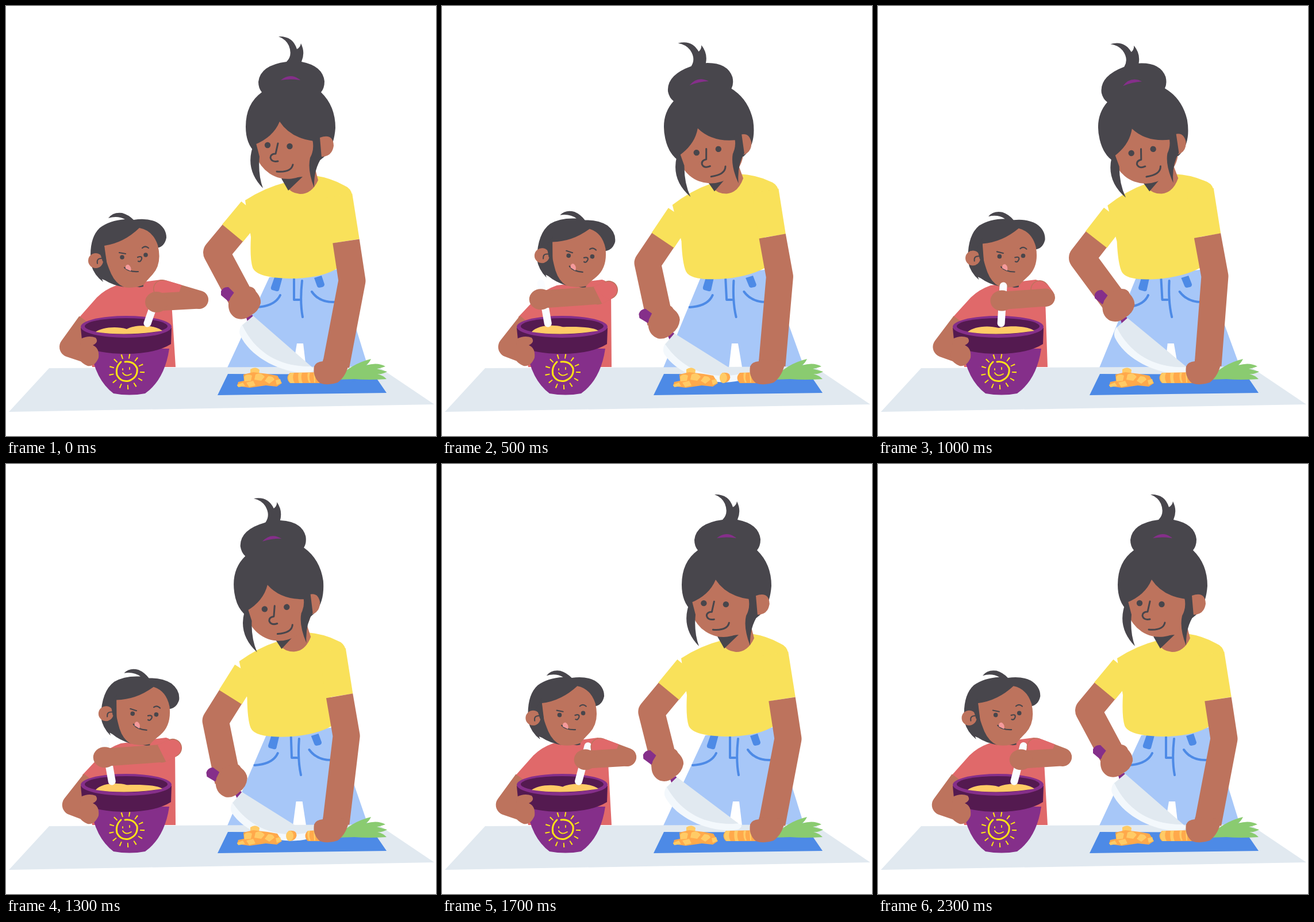
An HTML page for the animation above (2.4 s loop, 748x748 px).

```html
<!DOCTYPE html>
<html lang="en">
<head>
<meta charset="utf-8">
<title>Cooking together</title>
<style>
html, body { margin: 0; height: 100%; overflow: hidden; background: #fff; }
svg { display: block; width: 100%; height: 100%; }
.skin { fill: #bd735d; }
.hair { fill: #48464c; }
.red { fill: #e0696a; }
.yellow { fill: #f9e15a; }
.purple { fill: #852f8a; }
.dark { fill: #541a50; }
.blue { fill: #4d8ae6; }
.pale { fill: #e1e9f0; }
.orange { fill: #ffa94b; }
.light { fill: #ffcb66; }
.limb, .line { fill: none; stroke-linejoin: round; }
.limb { stroke: #bd735d; }
.sleeve { stroke: #f9e15a; stroke-width: 47; }
.line { stroke: #48464c; stroke-linecap: round; }
.denim { stroke: #4d8ae6; stroke-width: 4; }
.sun { stroke: #ffe414; }
</style>
</head>
<body>
<svg viewBox="0 0 748 748">
  <!-- child -->
  <g id="kidBody">
    <path class="red" d="M128 541L158 507Q172 493 192 486L270 476Q286 480 287 500L295 628H150Z"/>
  </g>
  <g id="kidHead">
    <path class="hair" d="M222 484L239 481V488Q230 491 222 486Z"/>
    <path class="hair" d="M178 369Q186 358 202 360Q213 363 222 372Q245 368 262 376Q279 386 279 403Q276 419 262 421L190 440L206 489Q186 486 172 477L167 475L169 480Q153 468 148 450Q143 405 163 386Q180 373 207 371Q194 364 178 369Z"/>
    <path class="skin" d="M171 417Q205 412 232 386Q255 390 264 416Q272 448 255 467Q240 483 240 485Q222 492 205 489Q191 483 183 466Q177 452 175 445Z"/>
    <circle class="skin" cx="156" cy="443" r="13"/>
    <path class="hair" d="M170 408L172 430L175 446L168 444L162 425Z"/>
    <path class="line" stroke-width="2" d="M159 448Q157 439 166 439"/>
    <circle class="hair" cx="202" cy="437" r="3.8"/>
    <circle class="hair" cx="243" cy="433" r="3.8"/>
    <path class="line" stroke-width="2.2" d="M197 429L208 431M237 421Q242 416 248 421M229 437Q237 434 236 440Q234 446 230 444M206 455Q214 463 230 462"/>
    <path fill="#f59a9b" d="M208 457Q207 449 213 450Q219 454 217 461Z"/>
  </g>

  <!-- mother, behind the table -->
  <g id="jeans">
    <path fill="#a7c7f8" d="M458 472L577 458L630 629H385Z"/>
    <path fill="#fff" d="M506 587H517L522 629H499Z"/>
    <path class="blue" d="M467 472L481 472L475 494Q474 497 470 496L463 494Q460 493 461 489ZM536 473L549 469L554 484Q554 488 550 489L545 490Q542 490 541 487Z"/>
    <path class="line denim" d="M501 475V511H510M515 478Q511 515 516 541M477 503Q468 522 436 524M532 497Q545 516 572 515"/>
  </g>
  <g id="torso">
    <path class="yellow" d="M486 307Q450 316 416 338L426 402Q424 440 429 455Q436 474 500 474Q550 473 577 456L570 400L602 328Q600 317 588 312Q565 299 537 295Z"/>
    <path class="skin" d="M482 300L537 280L543 303Q532 327 512 327Q496 326 488 314Z"/>
    <path class="hair" d="M479 300L516 297L491 321Z"/>
  </g>
  <line id="sleeveL" class="sleeve"/>
  <g id="head">
    <path class="hair" d="M474 53Q499 52 506 75Q512 72 513 65Q521 81 514 97Q551 104 554 131Q554 143 548 150Q573 174 573 212Q570 255 543 270L434 255Q417 240 417 210Q417 170 445 150Q439 143 439 132Q442 103 488 97Q499 86 492 69Q487 58 474 53Z"/>
    <path class="purple" d="M478 129Q495 115 512 129Q495 126 478 129Z"/>
    <g id="face">
      <path class="skin" d="M476 201Q465 228 433 241A57 57 0 0 0 542 267L536 235Q495 230 476 201Z"/>
      <g id="features">
        <circle class="hair" cx="455" cy="242" r="5.2"/>
        <circle class="hair" cx="493.5" cy="244" r="5.2"/>
        <path class="line" stroke-width="3" d="M473 239L469 257Q460 257 460 264Q462 272 473 270M471 288Q496 290 499 276"/>
      </g>
    </g>
    <path id="ear" class="skin" d="M546 229Q569 221 570 243Q567 264 545 262Z"/>
    <path id="lockL" class="hair" d="M429 246Q416 285 447 317Q438 292 441 262L434 235Z"/>
    <path id="lockR" class="hair" d="M533 232Q537 250 529 264Q524 285 536 316Q535 285 549 264L546 229Z"/>
  </g>

  <!-- table and bowl -->
  <path class="pale" d="M75 630L647 627L745 693L5 706Z"/>
  <path class="blue" d="M386 640L640 641L662 673L368 677Z"/>
  <polyline id="kidArmL" class="limb" stroke-width="36"/>
  <path class="purple" d="M147 596Q155 650 187 674Q215 679 242 674Q276 650 284 596Z"/>
  <path class="dark" d="M130 560L133 591Q160 605 209 605Q260 605 287 588L288 560Z"/>
  <ellipse class="purple" cx="209" cy="558" rx="79" ry="19"/>
  <ellipse class="dark" cx="209" cy="557" rx="72" ry="14"/>
  <path id="dough" class="light"/>
  <g class="sun">
    <path class="line sun" stroke-width="3" d="M200 619Q190 628 193 642Q200 655 214 652Q230 646 228 630Q222 617 207 619"/>
    <path class="line sun" stroke-width="1.8" d="M203 638Q208 646 218 640M203 631V633M215 629V632"/>
    <circle fill="none" stroke-width="8" stroke-dasharray="2 11.05" cx="210" cy="636" r="27"/>
  </g>
  <line id="spoon" stroke="#fafcff" stroke-width="13" stroke-linecap="round"/>
  <polyline id="kidArmR" class="limb" stroke-width="32" stroke-linecap="round"/>
  <g id="kidSleeve">
    <line stroke="#e0696a" stroke-width="32"/>
    <circle class="red" r="14.5"/>
  </g>
  <g id="kidFore">
    <line class="limb" stroke-width="31" stroke-linecap="round"/>
    <ellipse class="skin" rx="20" ry="18"/>
  </g>
  <path class="skin" d="M130 579Q144 572 156 577Q162 585 151 590Q163 595 161 612Q154 628 142 626Q122 618 128 600Z"/>

  <!-- knife arm -->
  <polyline id="armR" class="limb" stroke-width="46"/>
  <line id="sleeveR" class="sleeve"/>
  <g id="knife">
    <path class="purple" d="M374 496Q378 488 387 489L398 500L387 514L374 503ZM418 542L428 537L432 543L421 553Z"/>
    <path fill="#f3f8fc" d="M411 554Q450 605 528 625L536 631Q534 639 520 638C480 638 425 612 407 572Q404 563 411 554Z"/>
    <path class="pale" d="M430 539L531 627C485 628 437 610 411 555Z"/>
    <path class="skin" d="M390 508L400 494L421 488Q432 488 435 497Q444 507 443 517Q439 532 426 538Q414 548 400 543Q386 535 387 518Z"/>
  </g>

  <!-- vegetables -->
  <path class="light" d="M425 632Q434 626 441 633L440 641L425 642Z"/>
  <path class="orange" d="M413 641L430 637L455 640L472 643L480 656L471 662L452 660L424 664L402 661L404 654L414 652Z"/>
  <path class="light" d="M414 645Q420 638 428 643L426 652L415 653ZM434 641Q443 636 450 645L444 652L432 650ZM418 655L430 652L434 660L423 663ZM456 644Q465 643 467 650L458 657L450 652ZM402 659L412 655L416 661L404 663ZM469 651L477 649L479 656L471 659Z"/>
  <g id="carrot">
    <path class="orange"/>
    <path class="light"/>
  </g>
  <g id="slice">
    <path class="orange" d="M493 638Q507 636 507 646Q506 655 494 656Z"/>
    <ellipse class="light" cx="495" cy="647" rx="6.5" ry="9"/>
  </g>
  <path fill="#8acb70" d="M575 650Q600 622 635 614Q631 622 626 625Q647 619 660 627Q652 630 645 631L663 636Q655 641 646 640Q657 643 662 649Q630 651 606 649Z"/>
  <polyline id="armL" class="limb" stroke-width="47"/>
  <path class="skin" d="M552 614L597 617Q594 642 577 655Q560 661 546 656Q533 645 536 627Q539 619 551 618Z"/>
</svg>
<script>
const $ = id => document.getElementById(id);
const set = (el, attrs) => { for (const k in attrs) el.setAttribute(k, attrs[k]); };
const move = (id, transform) => set($(id), { transform });
const segment = (el, a, b) => set(el, { x1: a[0], y1: a[1], x2: b[0], y2: b[1] });
const distance = (a, b) => Math.hypot(b[0] - a[0], b[1] - a[1]);
const toward = (a, b, length) => {
  const k = length / distance(a, b);
  return [a[0] + (b[0] - a[0]) * k, a[1] + (b[1] - a[1]) * k];
};
const ease = (t, from, to) => {
  const x = Math.min(1, Math.max(0, (t - from) / (to - from)));
  return (1 - Math.cos(Math.PI * x)) / 2;
};

const stir = [0, .13, .49, .9, 1, .95, .55, .14];
const CHOP = 920;
// phase, handle x, handle y, tilt, elbow x, elbow y
const chop = [
  [0, 385, 501, 0, 366, 429],
  [80, 388, 506, -1.5, 372, 427],
  [230, 380, 526, -4, 375, 434],
  [380, 360, 540, -9, 375, 440],
  [500, 354, 539, -9, 373, 437],
  [580, 341, 532, -9, 364, 436],
  [750, 356, 512, -5, 364, 432],
  [CHOP, 385, 501, 0, 366, 429]
];

function chopPose(p) {
  const i = chop.findIndex(k => k[0] > p), a = chop[i - 1], b = chop[i];
  const x = (p - a[0]) / (b[0] - a[0]);
  return a.map((v, n) => v + (b[n] - v) * x);
}

// leans a part sideways while the table line stays put
const lean = (id, k, base) => move(id, `matrix(1 0 ${k} 1 ${-k * base} 0)`);

function drawChild(l) {
  lean('kidBody', -.058 * l, 628);
  move('kidHead', `translate(${19 * l} 0) rotate(${8 * l} 222 437)`);
  set($('kidArmL'), { points: `${142 + 8 * l},550 ${111 + 5 * l},593 150,606` });
  set($('dough'), { d: `M156 567C165 ${560 - 4 * l} 190 ${556 - 3 * l} 210 ${562 - 4 * l}` +
    `C225 ${553 + 5 * l} 260 ${555 + 2 * l} 272 565Q209 575 156 567Z` });
  segment($('spoon'), [267 - 100 * l, 492 - 10 * l], [246 - 65 * l, 552]);

  const hand = [262 - 95 * l, 515 - 5 * l];
  const elbow = [336 - 113 * l + 47 * l * l, 511 - 8 * l];
  const shoulder = [272 + 19 * l, 492 + 2 * l];
  const [sleeve, cap] = $('kidSleeve').children, [fore, fist] = $('kidFore').children;
  set($('kidArmR'), { points: `${shoulder} ${elbow}` });
  segment(sleeve, shoulder, toward(shoulder, elbow, Math.min(30 - 7 * l, distance(shoulder, elbow))));
  set(cap, { cx: shoulder[0], cy: shoulder[1] });
  segment(fore, hand, elbow);
  set(fist, { cx: hand[0], cy: hand[1] });
  // the sleeve passes in front once the arm is drawn in
  const [under, over] = l > .7 ? ['kidFore', 'kidSleeve'] : ['kidSleeve', 'kidFore'];
  $(over).before($(under));
}

function drawMother(w, f) {
  lean('jeans', .056 * w, 627);
  move('torso', `translate(${-5 * w} 0) rotate(${-5.7 * w} 500 460)`);
  move('head', `translate(${-34 * w} ${4 * w}) rotate(${-13.5 * w} 495 208)`);
  move('face', `translate(0 ${4 * f})`);
  move('features', `translate(${10 * f} 0)`);
  move('ear', `translate(${-8 * f} ${5 * f})`);
  move('lockL', `rotate(${8 * w} 428 250)`);
  move('lockR', `rotate(${10 * w} 545 245)`);
  const cuff = [591.5 - 18.5 * w, 409 - 9.5 * w];
  segment($('sleeveL'), [cuff[0] - 12.5, cuff[1] - 79], cuff);
  set($('armL'), { points: `${cuff} ${602 - 16 * w},${478 - 8 * w} 574,625` });
}

function drawKnife(p, w) {
  const [, x, y, tilt, ex, ey] = chopPose(p);
  const shoulder = [430 - 16 * w, 352 + 10 * w], elbow = [ex - 17 * w, ey + 11 * w];
  set($('armR'), { points: `${toward(shoulder, elbow, 50)} ${elbow} ${x + 26},${y + 12}` });
  segment($('sleeveR'), toward(shoulder, elbow, 4), toward(shoulder, elbow, 56));
  move('knife', `translate(${x - 385} ${y - 501}) rotate(${tilt} 385 501)`);

  const cut = p > 270 && p < 570;
  const left = cut ? 520 - (p - 380) * .058 : 489;
  const [body, stripes] = $('carrot').children;
  set(body, { d: `M${left + 5} 638L548 637V656L${left + 5} 656Q${left - 4} 647 ${left + 5} 638Z` });
  set(stripes, { d: (cut ? '' : 'M495 638Q486 647 495 656L502 656Q497 647 501 638ZM509 638L515 638Q512 647 516 656L510 656Q507 647 509 638Z') +
    'M525 638H529Q526 647 530 655H527Q523 647 525 638ZM535 638H538V655H536Z' });
  set($('slice'), { visibility: cut ? 'visible' : 'hidden',
    transform: `translate(${-(p - 340) * .035} 0)` });
}

function frame(now) {
  const t = Math.floor(now % 2400 / 100) * 100;
  const sway = ease(t, 0, 620) - ease(t, 1040, 1650);
  const nod = ease(t, 0, 520) - ease(t, 1350, 1750);
  drawChild(stir[t / 100 % 8]);
  drawMother(sway, nod);
  drawKnife(t < 2 * CHOP ? t % CHOP : 0, sway);
  requestAnimationFrame(frame);
}
frame(0);
</script>
</body>
</html>
```
